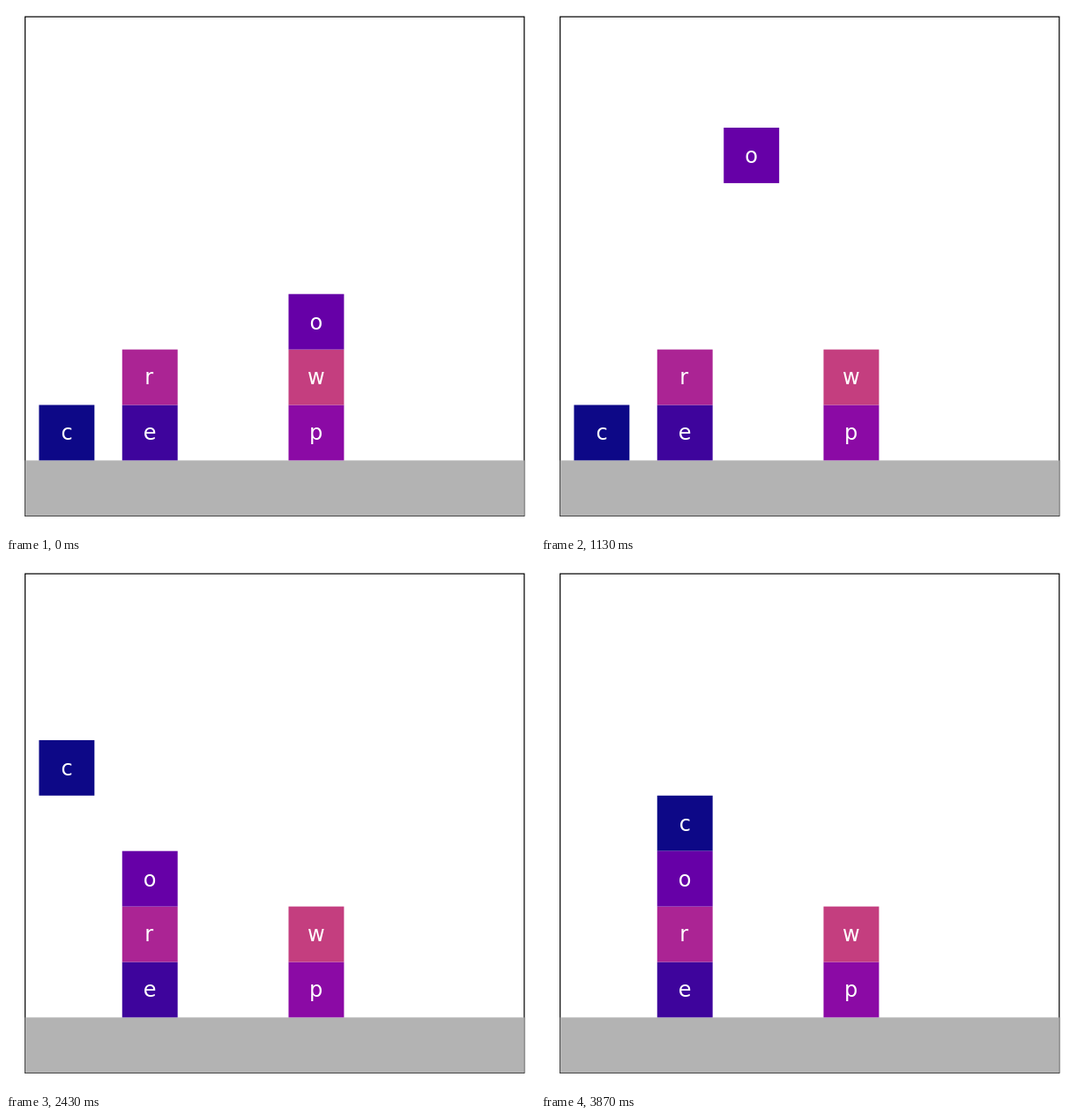
Write an HTML page with a canvas that moves like this. It is 600 px wide and 600 px high and loops after 3910 ms.

```html
<!DOCTYPE html>
<html lang="en">
<head>
<meta charset="utf-8">
<title>Stacking blocks</title>
<style>
  html, body { margin: 0; width: 100%; height: 100%; overflow: hidden; background: #fff; }
  canvas { display: block; }
</style>
</head>
<body>
<canvas id="stage" width="600" height="600"></canvas>
<script>
const ctx = document.getElementById('stage').getContext('2d');
const LOOP = 3910;
const UNIT = 62.9, LEFT = 21.7, FLOOR = 515.4;
const LIFTED = 5;

// Columns and levels are measured in block sizes from the left edge and the floor.
const blocks = [
  { letter: 'c', color: '#0d0887', col: 0.25, level: 0 },
  { letter: 'e', color: '#3e049c', col: 1.75, level: 0 },
  { letter: 'p', color: '#8b0aa5', col: 4.75, level: 0 },
  { letter: 'r', color: '#ab2494', col: 1.75, level: 1 },
  { letter: 'w', color: '#c43e7f', col: 4.75, level: 1 },
  { letter: 'o', color: '#6600a7', col: 4.75, level: 2 },
];

// Each move lifts a block, then carries it across and lowers it.
const moves = [
  { letter: 'o', lift: -1, carry: 28, col: 1.75, level: 2 },
  { letter: 'c', lift: 57, carry: 86, col: 1.75, level: 3 },
];

const mix = (a, b, k) => a + (b - a) * k;

// Linear progress; the first tick of a phase still shows the resting pose.
function progress(tick, start, length) {
  const step = tick - start;
  return step < 0 ? 0 : Math.min(step / length, 1);
}
const started = (tick, start, length) => tick < start + 2 ? 0 : progress(tick, start, length);

function pose(block, tick) {
  const move = moves.find(m => m.letter === block.letter);
  if (!move) return block;
  const up = started(tick, move.lift, 20);
  const across = started(tick, move.carry, 10);
  const down = progress(tick, move.carry + 10, 20);
  return {
    col: mix(block.col, move.col, across),
    level: down > 0 ? mix(LIFTED, move.level, down) : mix(block.level, LIFTED, up),
  };
}

function drawBlock(block, tick) {
  const { col, level } = pose(block, tick);
  const x = LEFT + col * UNIT, y = FLOOR - (level + 1) * UNIT;
  ctx.fillStyle = block.color;
  ctx.fillRect(x, y, UNIT, UNIT);
  // Centre the visible ink of the letter.
  const ink = ctx.measureText(block.letter);
  const shift = (ink.actualBoundingBoxLeft - ink.actualBoundingBoxRight) / 2;
  ctx.fillStyle = '#fff';
  ctx.fillText(block.letter, x + UNIT / 2 + shift, y + UNIT / 2 + 8.4);
}

function draw(now) {
  // 30 ticks per second, aligned to a 10 ms clock
  const time = Math.floor((now % LOOP) / 10) * 10;
  const tick = Math.floor((time + 4) * 0.03);
  ctx.fillStyle = '#fff';
  ctx.fillRect(0, 0, 600, 600);
  ctx.strokeStyle = '#000';
  ctx.lineWidth = 1.2;
  ctx.strokeRect(LEFT, FLOOR - 8 * UNIT, 9 * UNIT, 9 * UNIT);
  ctx.fillStyle = '#b3b3b3';
  ctx.fillRect(LEFT, FLOOR, 9 * UNIT, UNIT);
  ctx.font = '24px "DejaVu Sans", sans-serif';
  blocks.forEach(block => drawBlock(block, tick));
}

let origin;
function frame() {
  const now = performance.now();
  origin ??= now;
  draw(now - origin);
  requestAnimationFrame(frame);
}
frame();
</script>
</body>
</html>
```
